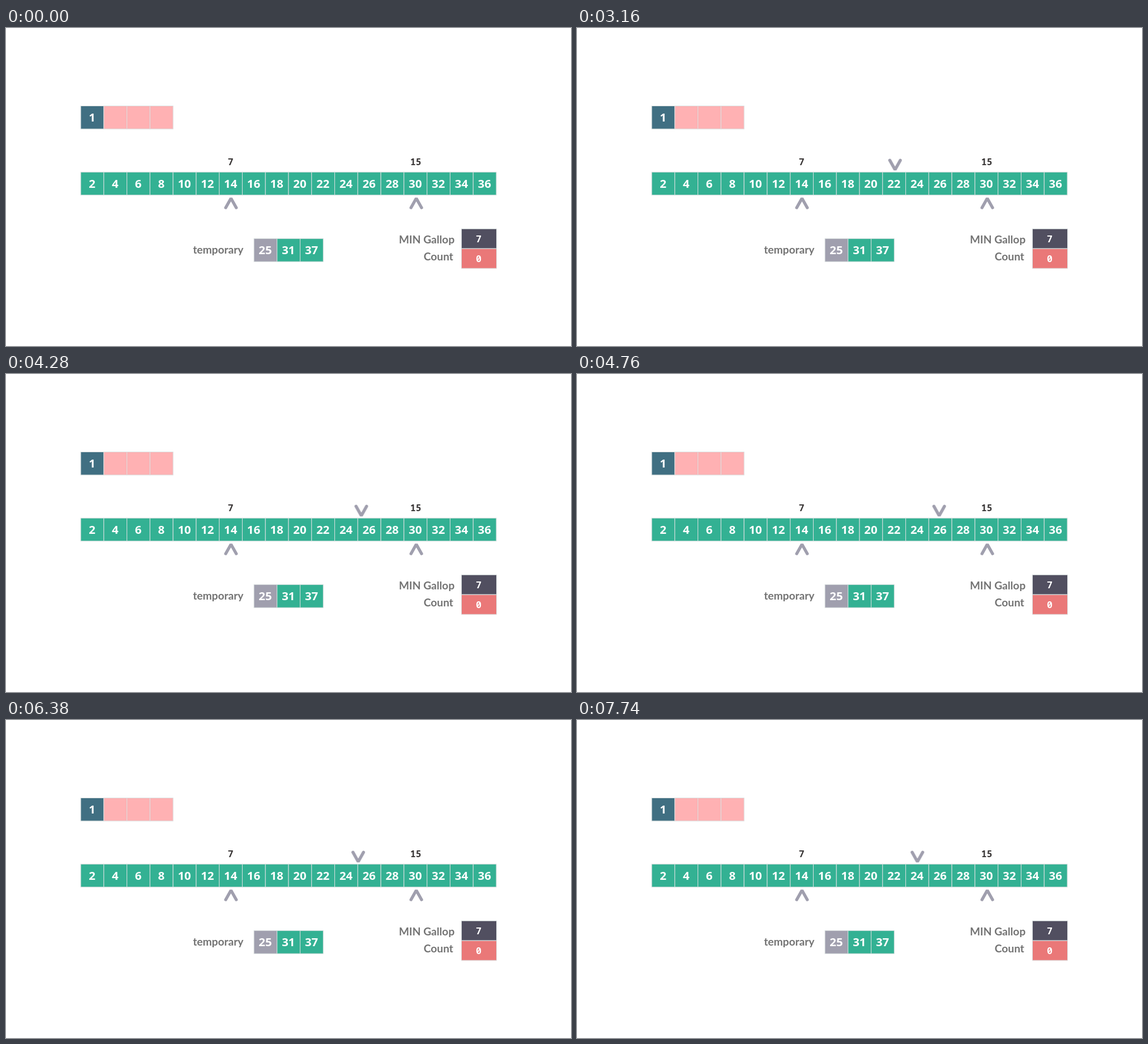
Recreate the animation shown at these times as an HTML page. Size 998 px wide and 561 px high, loop 8000 ms.

```html
<!DOCTYPE html>
<html lang="en">
<head>
<meta charset="utf-8">
<title>Gallop search</title>
<style>
  html, body { margin: 0; width: 100%; height: 100%; overflow: hidden; background: #fff; }
  svg { display: block; width: 998px; height: 561px; }
  text { text-anchor: middle; font: 700 20.4px "Open Sans", "Noto Sans", sans-serif; fill: #fff; }
  .mono { font: 700 16.5px "Noto Sans Mono", monospace; }
  .label { font: 700 19.2px Lato, sans-serif; fill: #737373; text-anchor: end; }
  .dark { fill: #3b3838; }
  rect { stroke: #d9dfdf; stroke-width: 1; }
  .arrow { fill: none; stroke: #a09fae; stroke-width: 5.4; stroke-linecap: round; stroke-linejoin: bevel; }
</style>
</head>
<body>
<svg id="stage" viewBox="0 0 998 561"></svg>
<script>
const stage = document.getElementById('stage');
const LOOP = 8000, CELL = 40.78, LEFT = 132;
const TEAL = '#33b193', GREY = '#a09fae', PINK = '#ffb1b3';

function add(tag, attrs, text) {
  const el = document.createElementNS('http://www.w3.org/2000/svg', tag);
  for (const key in attrs) el.setAttribute(key, attrs[key]);
  if (text !== undefined) el.textContent = text;
  return stage.appendChild(el);
}

function row(x, y, values, color) {
  values.forEach((value, i) => {
    const left = x + i * CELL;
    add('rect', { x: left, y, width: CELL, height: 40.6, fill: color(i) });
    add('text', { x: left + CELL / 2 - 0.4, y: y + 27.8 }, value);
  });
}

function box(y, value, fill) {
  add('rect', { x: 804.5, y, width: 62, height: 34.8, fill });
  add('text', { x: 835, y: y + 23.6, class: 'mono' }, value);
}

const mono = (x, text) => add('text', { x, y: 242, class: 'mono dark' }, text);
const label = (x, y, text) => add('text', { x, y, class: 'label' }, text);
const arrow = d => add('path', { d, class: 'arrow' });

row(LEFT, 137.5, [1, '', '', ''], i => i ? PINK : '#406f82');
row(LEFT, 254.2, Array.from({ length: 18 }, (_, i) => 2 * i + 2), () => TEAL);
row(438, 371.6, [25, 31, 37], i => i ? TEAL : GREY);
box(354.3, 7, '#514f60');
box(389.3, 0, '#ea7878');
mono(396.7, 7);
mono(723.8, 15);
label(419.5, 398.3, 'temporary');
label(792.3, 380.3, 'MIN Gallop');
label(790, 410, 'Count');

for (const x of [397.4, 724.7]) arrow(`M${x - 9.3} 317 L${x} 300.5 L${x + 9.3} 317`);
const probe = arrow('M-9.3 233.4 L0 250 L9.3 233.4');

// Each step: time, property values, easing towards the next step.
const GLIDE = 'cubic-bezier(.27,.1,.38,1)';
const at = (ms, x, opacity, easing = 'linear') =>
  ({ offset: ms / LOOP, transform: `translateX(${x}px)`, opacity, easing });

probe.animate([
  at(0, 561, 0),
  at(1500, 561, 0),
  at(1980, 561, 1),
  at(3120, 561, 1, GLIDE),
  at(5120, 642, 1),
  at(5700, 642, 1, GLIDE),
  at(7700, 601.3, 1),
  at(LOOP, 601.3, 1)
], { duration: LOOP, iterations: Infinity });
</script>
</body>
</html>
```
